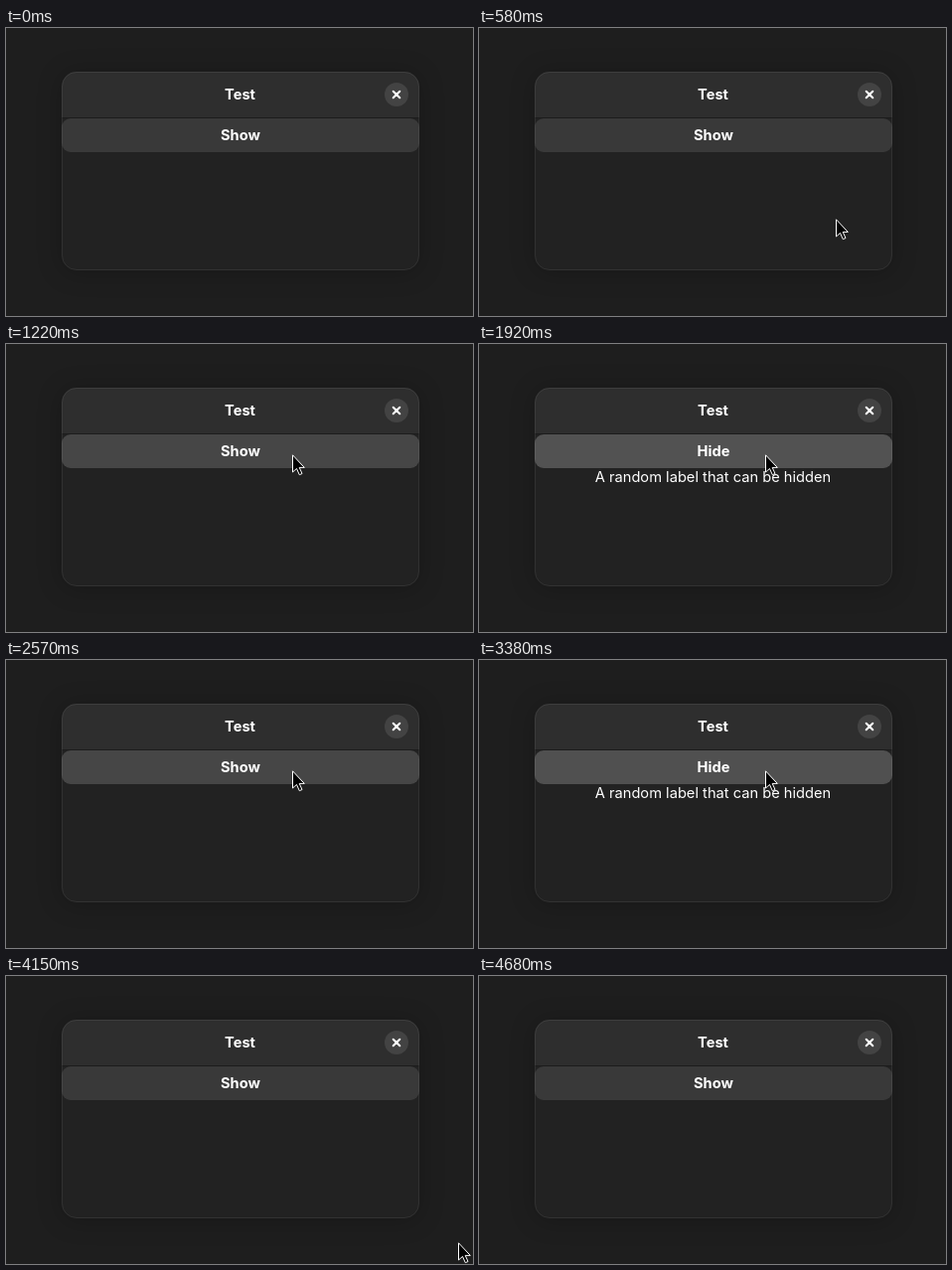
These frames come from a looping animation (470 by 290 pixels, 4920 ms). An HTML page:

```html
<!DOCTYPE html>
<html lang="en">
<head>
<meta charset="utf-8">
<style>
  html, body { margin: 0; width: 100%; height: 100%; overflow: hidden; background: #1e1e1e; }
  svg { display: block; width: 470px; height: 290px; }
  text { font: 14.67px Inter, sans-serif; fill: #fff; text-anchor: middle; }
  .bold { font-weight: 700; }
  .shadow { filter: drop-shadow(0 2px 12px rgba(0, 0, 0, .22)); }
</style>
</head>
<body>
<svg viewBox="0 0 470 290">
  <clipPath id="frame"><rect x="56" y="44" width="360" height="200" rx="15"/></clipPath>
  <rect class="shadow" x="56" y="44" width="360" height="200" rx="15" fill="#222"/>
  <g clip-path="url(#frame)">
    <rect x="56" y="44" width="360" height="46" fill="#2e2e2e"/>
    <rect x="56" y="90" width="360" height="1" fill="#1c1c1c"/>
  </g>
  <rect id="button" x="56" y="91" width="360" height="34" rx="9" fill="#fff"/>
  <rect x="56.5" y="44.5" width="359" height="199" rx="14.5" fill="none" stroke="#fff" stroke-opacity=".07"/>
  <circle cx="393" cy="67" r="12" fill="#434343"/>
  <path d="M389.7 63.7l6.6 6.6m0-6.6l-6.6 6.6" stroke="#fff" stroke-width="2" stroke-linecap="round"/>
  <text class="bold" x="235.5" y="72">Test</text>
  <text class="bold" x="236" y="113" id="caption">Show</text>
  <text x="235.5" y="139" id="label">A random label that can be hidden</text>
  <path id="cursor" d="M.5 .8V18l4-3.6 2.8 6.3 2.7-1.2-2.8-6.1h5.1z" fill="#000" stroke="#fff" stroke-linejoin="round"/>
</svg>
<script>
const LOOP = 4920, FADE = 200;
const REST = .1, HOVER = .15, PRESSED = .3;

// Pointer path: time, x, y
const path = [
  [420, 423, 272], [580, 360, 193], [670, 302, 124], [720, 288, 111],
  [4000, 288, 111], [4020, 288, 113], [4050, 305, 132], [4080, 340, 168],
  [4110, 385, 210], [4140, 439, 254], [4170, 482, 292]
];

// Button states: time, target opacity, head start of the fade
const states = [
  [670, HOVER, 0],
  [1220, PRESSED, 10], [1270, HOVER, 0],
  [1880, PRESSED, 10], [1980, HOVER, 0],
  [2570, PRESSED, 10], [2640, HOVER, 0],
  [3380, PRESSED, 43], [3430, HOVER, 0],
  [4030, REST, 0]
];
const toggles = [1270, 1980, 2640, 3430];

const [button, caption, label, cursor] =
  ['button', 'caption', 'label', 'cursor'].map(id => document.getElementById(id));
const easeOut = p => p * (2 - p);

function opacityAt(t) {
  let value = REST;
  states.forEach(([start, target, lead], i) => {
    if (t < start) return;
    const end = Math.min(t, states[i + 1]?.[0] ?? LOOP);
    value += (target - value) * easeOut(Math.min(1, (end - start + lead) / FADE));
  });
  return value;
}

function pointerAt(t) {
  const i = path.findIndex(point => point[0] > t);
  if (i < 1) return null;
  const [t0, x0, y0] = path[i - 1], [t1, x1, y1] = path[i];
  const p = (t - t0) / (t1 - t0);
  return [x0 + (x1 - x0) * p, y0 + (y1 - y0) * p];
}

function draw(now) {
  const t = now % LOOP;
  const shown = toggles.filter(time => t >= time).length % 2 === 1;
  const pointer = pointerAt(t);
  button.setAttribute('fill-opacity', opacityAt(t));
  caption.textContent = shown ? 'Hide' : 'Show';
  label.style.display = shown ? '' : 'none';
  cursor.style.display = pointer ? '' : 'none';
  if (pointer) cursor.setAttribute('transform', `translate(${pointer.map(Math.round)})`);
}

const begin = performance.now();
function tick() {
  draw(performance.now() - begin);
  requestAnimationFrame(tick);
}
tick();
</script>
</body>
</html>
```
